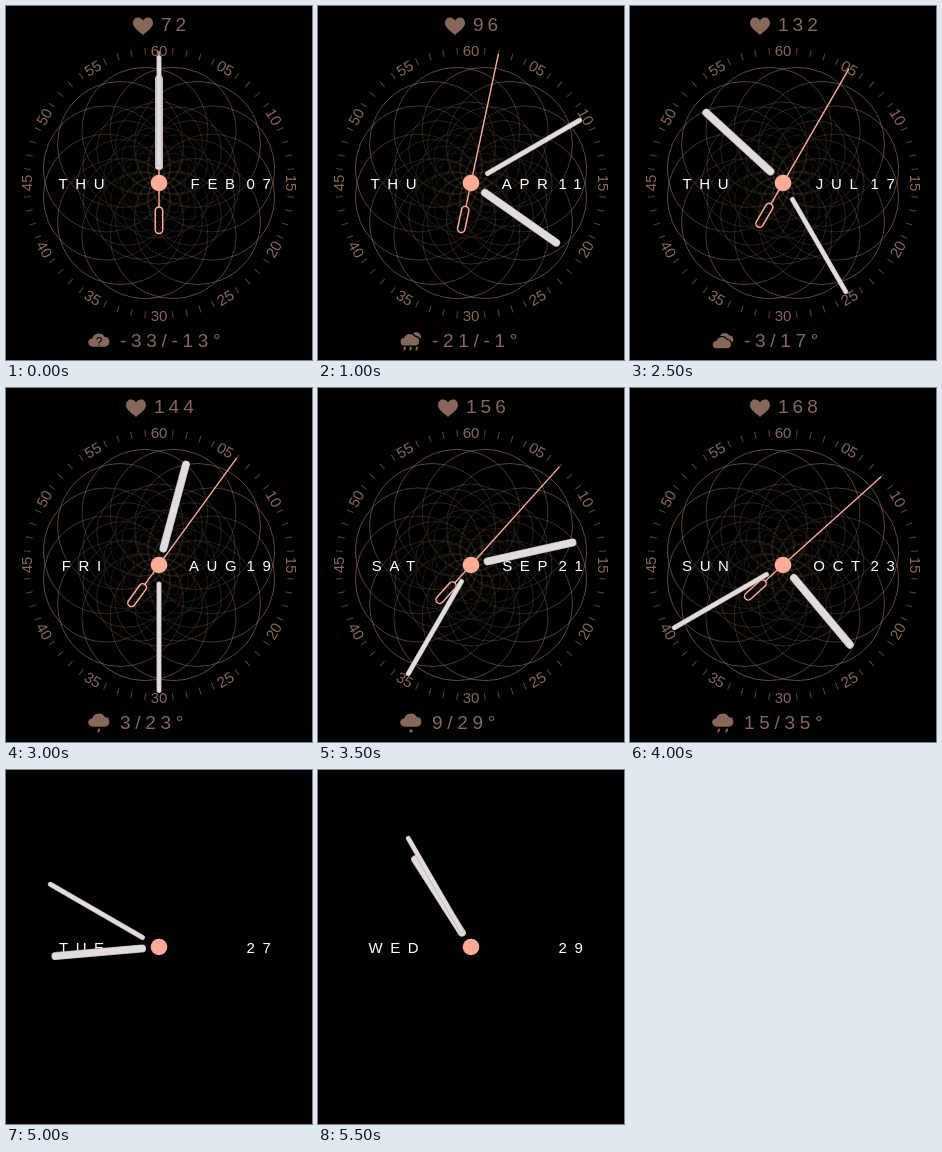
An HTML page with a canvas that plays this animation: 306 by 354 pixels, repeating every 6 s.

```html
<!DOCTYPE html>
<html lang="en">
<head>
<meta charset="utf-8">
<title>Watch face</title>
<style>
html, body { margin: 0; height: 100%; overflow: hidden; background: #000; }
canvas { display: block; }
</style>
</head>
<body>
<canvas id="face" width="306" height="354"></canvas>
<script>
const ctx = document.getElementById('face').getContext('2d');
const CX = 153, CY = 177, TAU = Math.PI * 2;
const BROWN = '#87675a', DIM = '#5b463d', SALMON = '#ffab96', WHITE = '#fff', HAND = '#e2dcdf';
const STEP = 500, STEPS = 12, AMBIENT = 10;
const MONTHS = 'FEB MAR APR MAY JUN JUL AUG SEP OCT NOV DEC JAN'.split(' ');
const DAYS = 'THU SAT THU TUE WED THU FRI SAT SUN MON TUE WED'.split(' ');
const HEART = new Path2D('M0 9C-3 6-10 2-10-3C-10-6.5-7.5-8.5-5-8.5C-2.5-8.5-.8-7 0-5.3C.8-7 2.5-8.5 5-8.5C7.5-8.5 10-6.5 10-3C10 2 3 6 0 9z');
const CLOUD = new Path2D('M-6 6a4.5 4.5 0 0 1-.5-9a6.5 6.5 0 0 1 12-1.5a5.3 5.3 0 0 1 .5 10.5z');

// Lines of the rosette fade towards the centre
const fade = ctx.createRadialGradient(CX, CY, 0, CX, CY, 117);
fade.addColorStop(0, 'rgba(110,95,75,.1)');
fade.addColorStop(0.35, 'rgba(130,105,82,.22)');
fade.addColorStop(0.7, 'rgba(150,114,92,.5)');
fade.addColorStop(1, 'rgba(150,114,92,.9)');

function at(x, y, angle, draw) {
  ctx.save();
  ctx.translate(x, y);
  ctx.rotate(angle);
  draw();
  ctx.restore();
}

function text(str, x, y, size, color, spacing = 0, align = 'left') {
  ctx.font = `${size}px "Liberation Sans", Arial, sans-serif`;
  ctx.letterSpacing = spacing + 'px';
  ctx.textAlign = align;
  ctx.fillStyle = color;
  ctx.fillText(str, x, y);
}

function line(x1, y1, x2, y2, width, color, cap = 'butt') {
  ctx.beginPath();
  ctx.moveTo(x1, y1);
  ctx.lineTo(x2, y2);
  ctx.lineWidth = width;
  ctx.lineCap = cap;
  ctx.strokeStyle = color;
  ctx.stroke();
}

function dot(x, y, r, color = BROWN) {
  ctx.beginPath();
  ctx.arc(x, y, r, 0, TAU);
  ctx.fillStyle = color;
  ctx.fill();
}

function rosette() {
  ctx.lineWidth = 0.7;
  ctx.strokeStyle = fade;
  for (let ring = 0, scale = 1; ring < 5; ring++, scale *= 0.69) {
    for (let i = 0; i < 12; i++) {
      const a = (i + (ring + 1) % 2 / 2) * TAU / 12, d = 54.5 * scale;
      ctx.beginPath();
      ctx.arc(CX + d * Math.cos(a), CY + d * Math.sin(a), 63 * scale, 0, TAU);
      ctx.stroke();
    }
  }
}

function dial() {
  for (let m = 0; m < 60; m++) {
    const a = m * TAU / 60;
    if (m % 5) {
      at(CX, CY, a, () => line(0, -129, 0, -136, 1, DIM));
      continue;
    }
    const flip = m > 15 && m < 45 ? Math.PI : 0;
    at(CX + 132.5 * Math.sin(a), CY - 132.5 * Math.cos(a), a + flip,
      () => text(String(m || 60).padStart(2, '0'), 0, 5.3, 15, BROWN, 0, 'center'));
  }
}

function cloud(x = 0, y = 0, s = 1) {
  ctx.save();
  ctx.translate(x, y);
  ctx.scale(s, s * 0.95);
  ctx.lineWidth = 3;
  ctx.strokeStyle = '#000';
  ctx.stroke(CLOUD);
  ctx.fillStyle = BROWN;
  ctx.fill(CLOUD);
  ctx.restore();
}

const sunCloud = y => { dot(5, y - 2, 4.8); cloud(-1, y + 1.5, 0.88); };
const flakes = (...xs) => xs.forEach(x => dot(x, 8, 1.7));
const rain = (...xs) => xs.forEach(x => line(x, 6.5, x - 0.7, 8.5, 2, BROWN, 'round'));

function sun() {
  dot(0, 0, 5.5);
  for (let i = 0; i < 8; i++) at(0, 0, i * TAU / 8, () => line(0, -8, 0, -10, 1.8, BROWN, 'round'));
}

const WEATHER = [
  () => { cloud(); text('?', 0, 5, 12, '#000', 0, 'center'); },
  () => sunCloud(0),
  () => { sunCloud(-2); rain(-6, 0, 6); },
  () => { sunCloud(-1); flakes(3); },
  sun,
  () => { cloud(2, -2, 0.8); cloud(-1, 2.5, 0.85); },
  () => { cloud(0, -2); rain(0); },
  () => { cloud(0, -2); flakes(0); },
  () => { cloud(0, -2); rain(-4, 4); },
  () => { cloud(0, -2); flakes(-4, 4); }
];

function status(k) {
  const pulse = 72 + 12 * k, wide = pulse > 99;
  at(wide ? 130 : 137, 20, 0, () => { ctx.fillStyle = BROWN; ctx.fill(HEART); });
  text(pulse, wide ? 148 : 155, 25, 19, BROWN, 4);
  at(93, 335, 0, WEATHER[k]);
  text(`${6 * k - 33}/${6 * k - 13}°`, 114, 341, 19, BROWN, 4.7);
}

function label(str, x, align) {
  text(str, x, 183, 15, WHITE, 7.6, align);
}

function secondHand(k) {
  at(CX, CY, k * TAU / 60, () => {
    line(0, -132, 0, 24, 1.4, SALMON);
    ctx.beginPath();
    ctx.roundRect(-3.7, 24, 7.4, 26.5, 3.7);
    ctx.lineWidth = 1.5;
    ctx.stroke();
  });
}

function hand(turn, from, to, width) {
  at(CX, CY, turn * TAU, () => {
    line(0, -from, 0, -to, width, '#b5aaac', 'round');
    line(0, -from, 0, -to, width - 1.2, HAND, 'round');
  });
}

function draw(k) {
  const active = k < AMBIENT;
  ctx.fillStyle = '#000';
  ctx.fillRect(0, 0, 306, 354);
  if (active) {
    rosette();
    dial();
    status(k);
  }
  label(DAYS[k], 79.3, 'center');
  if (active) label(MONTHS[k], 210.6, 'center');
  label(String(7 + 2 * k).padStart(2, '0'), 240.5, 'left');
  if (active) secondHand(k);
  const minutes = 125 * k;
  hand(minutes / 720, 17, 104, 8);
  hand(minutes / 60, 19, 125.5, 5);
  dot(CX, CY, 8.3, SALMON);
}

const start = performance.now();
function tick() {
  draw(Math.floor((performance.now() - start) / STEP) % STEPS);
  requestAnimationFrame(tick);
}
tick();
</script>
</body>
</html>
```
